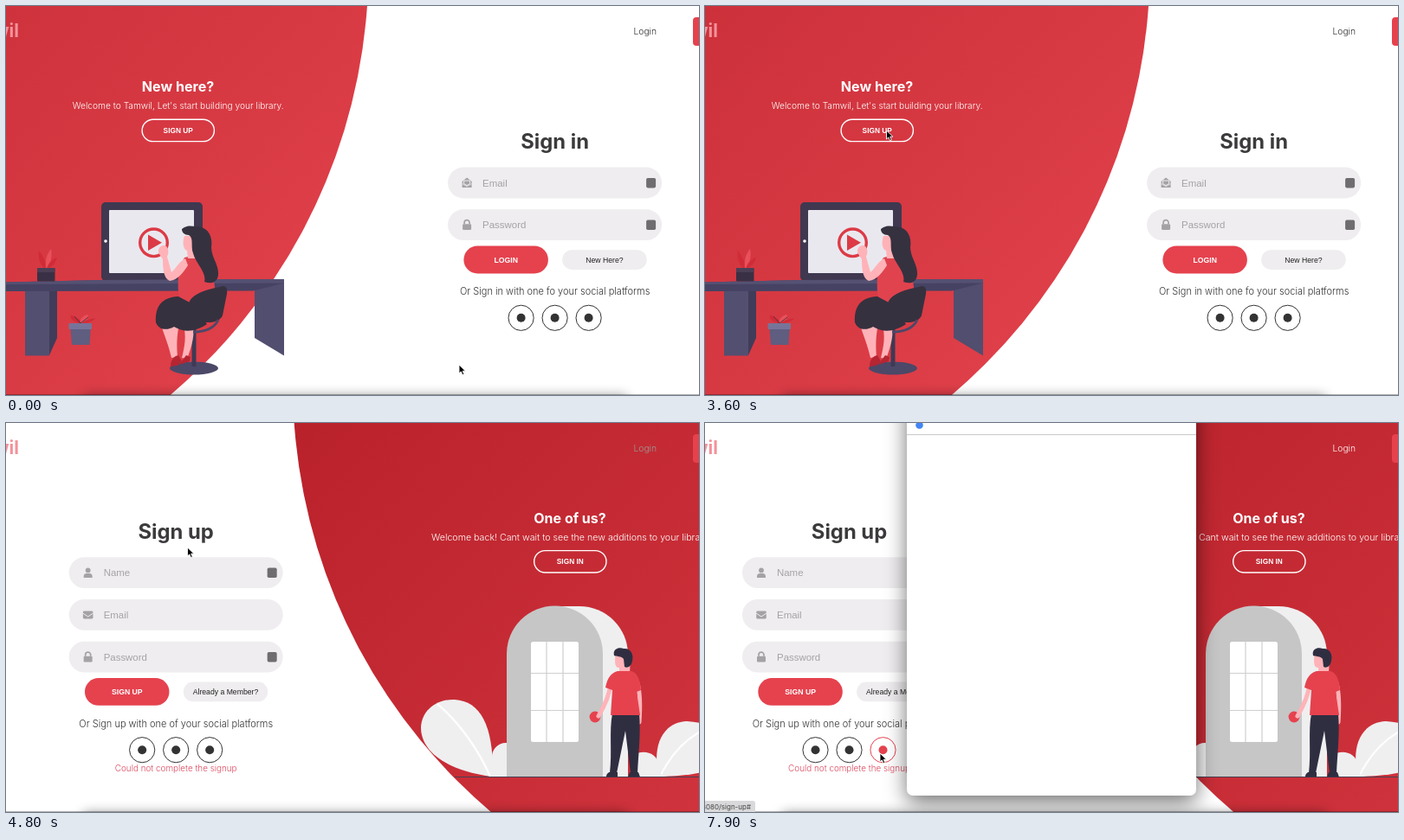
An HTML page for the animation above (8 s loop, 800 px wide and 450 px high).

```html
<!DOCTYPE html>
<html lang="en">
<head>
<meta charset="utf-8">
<title>Sign in / sign up</title>
<style>
html, body { margin: 0; width: 100%; height: 100%; overflow: hidden; background: #fff; }
svg { display: block; width: 800px; height: 450px; }
text { font-family: Inter, "Open Sans", sans-serif; }
.a { font-family: "Liberation Sans", Arial, sans-serif; }
.m { text-anchor: middle; }
.b { font-weight: 700; }
.l { font-weight: 300; }
</style>
</head>
<body>
<svg id="stage" viewBox="0 0 800 450"></svg>
<script>
const RED = '#e5424e', PALE = '#efedef', GREY = '#a4a2a5', INK = '#333', DARK = '#2f2e41', SKIN = '#ffb3b8';

const text = (x, y, size, str, cls, fill) =>
  `<text x="${x}" y="${y}" font-size="${size}" class="${cls}" fill="${fill}">${str}</text>`;
const box = (x, y, w, h, r, fill, more = '') =>
  `<rect x="${x}" y="${y}" width="${w}" height="${h}" rx="${r}" fill="${fill}" ${more}/>`;
const path = (d, fill) => `<path d="${d}" fill="${fill}"/>`;
const line = (d, stroke, w, more = '') =>
  `<path d="${d}" fill="none" stroke="${stroke}" stroke-width="${w}" ${more}/>`;
const disc = (x, y, r, fill, more = '') => `<circle cx="${x}" cy="${y}" r="${r}" fill="${fill}" ${more}/>`;

// Forms
const icons = {
  open: path('M-5.5-1.5L0-6 5.5-1.5V5.5H-5.5Z', GREY) +
    line('M-3.5-2.5H3.5V1L0 3-3.5 1Z', PALE, 1) + line('M-5.5 1L0 4 5.5 1', PALE, .8),
  mail: box(-5.8, -4.4, 11.6, 8.8, 1.3, GREY) + line('M-6-2L0 2 6-2', PALE, 1),
  lock: box(-5, -1, 10, 6.7, 1.2, GREY) + line('M-3-1V-2.6A3 3 0 0 1 3-2.6V-1', GREY, 1.7),
  user: disc(0, -2.8, 2.9, GREY) + path('M-5 5.7V4A3.5 3.5 0 0 1-1.5.8H1.5A3.5 3.5 0 0 1 5 4V5.7Z', GREY)
};
const field = (y, icon, label, square) =>
  box(-123.5, y, 247, 35.8, 17.9, PALE) +
  `<g transform="translate(-101.5 ${y + 18})">${icons[icon]}</g>` +
  text(-83.5, y + 21.9, 11.45, label, 'a', GREY) +
  (square ? box(105.5, y + 12.3, 11, 11.5, 1.8, '#6f6d70') : '');

// y is the top of the main button
const form = (id, title, titleY, fields, y, main, other, social) =>
  `<g id="${id}">` + text(0, titleY, 23.8, title, 'm b', '#3c3a3c') + fields +
  box(-105.2, y, 97.5, 31.8, 15.9, RED) + text(-56.4, y + 19, 8.67, main, 'a b m', '#fff') +
  box(8.6, y + 4.6, 97.5, 22.7, 11.3, PALE) + text(57.3, y + 19, 8.67, other, 'a m', '#222') +
  text(0, y + 56.7, 11, social, 'm l', INK) +
  [-39, 0, 39].map((x, i) => `<g id="${id}${i}" stroke="${INK}" fill="${INK}">` +
    `<circle cx="${x}" cy="${y + 83.2}" r="14.6" fill="none"/>` +
    `<circle cx="${x}" cy="${y + 83.2}" r="5" stroke="none"/></g>`).join('');

const forms =
  form('in', 'Sign in', 164.7, field(186.6, 'open', 'Email', 1) + field(235.3, 'lock', 'Password', 1),
    277.6, 'LOGIN', 'New Here?', 'Or Sign in with one fo your social platforms') + '</g>' +
  form('up', 'Sign up', 133.7,
    field(155.2, 'user', 'Name', 1) + field(204, 'mail', 'Email') + field(252.7, 'lock', 'Password', 1),
    295, 'SIGN UP', 'Already a Member?', 'Or Sign up with one of your social platforms') +
  text(0, 403, 9.9, 'Could not complete the signup', 'm l', '#dc4a60') + '</g>';

// Panels
const outlined = (x, y, label) =>
  box(x - 41.6, y, 83.3, 25.4, 12.7, 'none', 'stroke="#fff" stroke-width="1.4"') +
  text(x, y + 15.7, 8.32, label, 'a b m', '#fff');

const leftText = text(198.5, 98.7, 16.1, 'New here?', 'm b', '#fff') +
  text(198.7, 118.8, 10.2, "Welcome to Tamwil, Let's start building your library.", 'm l', '#fff') +
  outlined(198.7, 131.2, 'SIGN UP');
const rightText = text(651, 115.7, 16, 'One of us?', 'm b', '#fff') +
  text(491, 135.8, 10.65, 'Welcome back! Cant wait to see the new additions to your library.', 'l', '#fff') +
  outlined(651.3, 147.6, 'SIGN IN');

const sprig = (x, y) => `<g transform="translate(${x} ${y})">` +
  path('M-1 0C-8-5-9-14-8-21-3-15 0-8 1 0Z', '#d02c38') +
  path('M0 0C-1-10 1-17 6-23 8-14 5-6 2 0Z', '#e8505a') +
  path('M1 0C3-7 7-11 13-13 11-6 7-2 2 0Z', '#d02c38') + '</g>';

const desk =
  // tablet
  box(110, 227, 117, 91, 5, '#3f3850') + box(119, 236, 98, 73, 1, '#eae8ef') + disc(115, 272, 1.8, '#fff') +
  disc(170.5, 273.8, 15.8, 'none', `stroke="#dc3b46" stroke-width="3.4"`) +
  path('M164 264.5L180 273.8 164 283Z', '#dc3b46') +
  // table
  path('M50 328H59V384L50 404Z', '#403c5a') + path('M22 328H50V404.5H22Z', '#534f70') +
  path('M287 326L321 319V404.5L287 384Z', '#524e6f') +
  path('M0 319.5L110 317 321 316V320.5L285 329.5 0 330Z', '#464263') +
  path('M0 319.5L110 317 321 316V320.5L0 322Z', '#555173') +
  // pots
  sprig(46, 304) + box(36, 303, 20.5, 15.5, 1, '#3a3045') + box(36, 303, 20.5, 5, 1, '#4b3f55') +
  `<g transform="translate(86 367) scale(1.35 .45)">${sprig(0, 0)}</g>` +
  line('M79 359L86 367 95 360', '#3a3045', .8) +
  path('M74 368H98L96.5 392H76Z', '#5f5d80') + box(72.5, 367, 26.5, 7, 1, '#77749a') +
  // chair base and legs
  `<ellipse cx="217" cy="419" rx="28" ry="7.5" fill="#4c4868"/>` + path('M214.5 352H219.5V417H214.5Z', '#3e3a55') +
  path('M178 366C183 382 188 393 191 407L198 406C197 393 197 382 200 368Z', SKIN) +
  path('M204 366C209 382 206 394 203 407L209 408C215 393 218 380 216 366Z', SKIN) +
  path('M190 417C190 409 194 405 199 404L203 411 198 416Z', '#b52532') +
  path('M200 415L208 404 213 406 212 411Z', '#b52532') +
  // dress, skirt, arm
  path('M206 291C216 288 232 291 237 297L242 332C234 344 216 350 201 340 197 328 200 318 198 307Z', '#e0434e') +
  path('M173 366C172 347 180 337 199 336L214 344 232 368C220 376 207 379 194 371 187 375 177 376 173 366Z', '#35313f') +
  path('M207 292C199 296 197 303 191 308L186 290C189 284 187 278 183 277 178 276 174 282 177 287L181 293C181 304 182 315 189 318 198 317 205 308 210 300Z', SKIN) +
  path('M206 266C203 274 205 282 209 283L210 292 222 292 225 266Z', SKIN) +
  // hair and chair
  path('M203 258C209 253 215 255 219 255 233 255 239 266 237 279 237 291 246 299 245 311 244 320 237 322 229 319 232 308 219 298 216 286 213 278 217 268 211 265 206 265 203 262 203 258Z', '#36313f') +
  path('M211 350C208 337 224 329 247 325 254 322 256 327 255 333L250 358C246 369 218 371 211 350Z', '#36313f') +
  line('M245 363C240 374 227 377 216 377', '#4c4868', 3);

const bigLeaf = path('M560 409C510 402 479 381 479 352 480 331 499 319 518 320 549 322 563 352 562 409Z', '#efeff0') +
  line('M498 325C524 347 546 379 559 409', '#fff', 2.2);
const door = bigLeaf + disc(577, 386, 16, '#efeff0') + path('M561 386H590V409H559Z', '#efeff0') +
  path('M754 409C745 376 757 346 786 345 820 347 839 363 838 379 835 398 808 408 754 409Z', '#efeff0') +
  line('M755 409C766 386 783 367 803 356', '#fff', 2) +
  path('M724 409V384C736 377 751 381 754 395L757 409Z', '#efeff0') +
  path('M634 212H662A56 56 0 0 1 718 268V409H634Z', '#efeff0') +
  path('M578 409V267A55.3 55.3 0 0 1 689 267V409Z', '#c6c6c6') +
  box(606, 253, 55, 116, 2.5, '#fff') +
  line('M624 253V369M643 253V369M606 289.5H661M606 332.5H661', '#cfcfcf', 1.2) +
  line('M518 409.5H840', '#4a4050', 1.2) + disc(680, 340, 6.4, RED) +
  // visitor
  line('M698 302C696 317 690 329 684 339', SKIN, 5, 'stroke-linecap="round"') +
  line('M729 301C733 316 732 332 731 346', SKIN, 5, 'stroke-linecap="round"') +
  path('M700 336H731C733 360 730 383 729 405H721L715 356 705 405H697C700 380 696 357 700 336Z', DARK) +
  path('M696 404H706V409.5H693C693 406 695 405 696 404ZM720 404H730L732 409.5H718Z', DARK) +
  path('M704 267H721L720 291H708V283C703 284 702 276 704 267Z', SKIN) +
  path('M702 269C700 261 708 259 713 261 721 260 725 268 723 275 722 282 717 284 714 282L713 273C710 269 706 271 702 269Z', DARK) +
  path('M706 287H722C729 289 732 297 733 309L728 311 732 338H698L700 309 692 306C694 296 698 289 706 287Z', RED);

stage.innerHTML = `<defs>
  <linearGradient id="grad" x1="1" y1="1" x2="0" y2="0">
    <stop stop-color="#e74650"/><stop offset="1" stop-color="#a9141d"/></linearGradient>
  <filter id="blur" x="-10%" y="-200%" width="120%" height="500%"><feGaussianBlur stdDeviation="7"/></filter>
  </defs>` + forms + disc(0, -45, 650, 'url(#grad)', 'id="blob"') +
  `<g id="leftImg">${desk}</g><g id="leftTxt">${leftText}</g>
  <g id="rightImg">${door}</g><g id="rightTxt">${rightText}</g>` +
  `<text x="15" y="36" font-size="21" class="b" text-anchor="end" fill="#f3929a">Tamwil</text>` +
  `<text id="nav" x="724.5" y="33" font-size="10.3" class="l">Login</text>` + box(793, 13, 40, 33, 4, RED) +
  box(88, 451, 630, 30, 6, '#000', 'opacity=".42" filter="url(#blur)"') +
  box(0, 449, 800, 1, 0, '#000', 'opacity=".3"') +
  `<g id="status">${box(-5, 437, 63, 18, 3, '#d9d8da')}
  <text x="53" y="446.6" font-size="8" text-anchor="end" fill="#444">localhost:8080/sign-up#</text></g>
  <g id="popup" style="filter:drop-shadow(0 8px 12px rgba(0,0,0,.55))">` +
  box(233, -30, 334, 461, 7, '#fff') + box(233, 13, 334, 1, 0, '#c9c9c9') + disc(247.5, 2.5, 4.3, '#4285f4') + `</g>
  <path id="cursor" d="M0 0V10L2.3 7.9 4 11.8 5.8 11 4.2 7.2H7.4Z" stroke="#fff" stroke-width=".9"/>`;

// Motion
const clamp = v => Math.min(1, Math.max(0, v));
const mix = (a, b, p) => a + (b - a) * p;

// cubic-bezier(.42, 0, .58, 1)
function ease(x) {
  let lo = 0, hi = 1;
  for (let i = 0; i < 24; i++) {
    const s = (lo + hi) / 2;
    if (1.26 * s * (1 - s) ** 2 + 1.74 * (1 - s) * s * s + s ** 3 < x) lo = s; else hi = s;
  }
  return lo * lo * (3 - 2 * lo);
}
const CLICK = 3254;
const slide = (t, delay, dur) => ease(clamp((t - CLICK - delay) / dur));

const mouse = [[200, 523, 415], [1800, 254, 196], [2500, 239, 178], [3100, 209.5, 144],
  [5000, 209.5, 144], [5600, 186, 374], [5800, 184.5, 381], [6500, 202, 382]];
function mouseAt(t) {
  const i = mouse.findIndex(k => k[0] > t);
  if (i === 0) return mouse[0].slice(1);
  if (i < 0) return mouse[mouse.length - 1].slice(1);
  const [a, b] = [mouse[i - 1], mouse[i]], p = ease((t - a[0]) / (b[0] - a[0]));
  return [mix(a[1], b[1], p), mix(a[2], b[2], p)];
}

const el = id => document.getElementById(id);
const move = (id, x, y = 0) => el(id).setAttribute('transform', `translate(${x} ${y})`);
const show = (id, on) => el(id).setAttribute('visibility', on ? 'visible' : 'hidden');

function draw(t) {
  const img = slide(t, 390, 1100), txt = slide(t, 590, 900), formX = mix(633.6, 166.5, slide(t, 723, 1000));
  move('blob', mix(-231.5, 1031.5, slide(t, 0, 1800)));
  move('leftImg', -520 * img);
  move('leftTxt', -520 * txt);
  move('rightImg', 520 * (1 - img));
  move('rightTxt', 520 * (1 - txt));
  move('in', formX);
  move('up', formX);
  show('in', t < 4150);
  show('up', t >= 4150);
  const c = Math.round(mix(45, 255, clamp((t - 4350) / 850)));
  el('nav').setAttribute('fill', `rgb(${c},${c},${c})`);

  const [x, y] = mouseAt(t), hover = Math.hypot(x - 205.5, y - 378.2) < 15;
  move('cursor', x, y);
  el('up2').setAttribute('fill', hover ? RED : INK);
  el('up2').setAttribute('stroke', hover ? RED : INK);
  show('status', hover);
  show('popup', t >= 7800);
}

// Ten pictures a second
const start = performance.now();
function tick() {
  draw(Math.floor((performance.now() - start) % 8000 / 100) * 100);
  requestAnimationFrame(tick);
}
tick();
</script>
</body>
</html>
```
